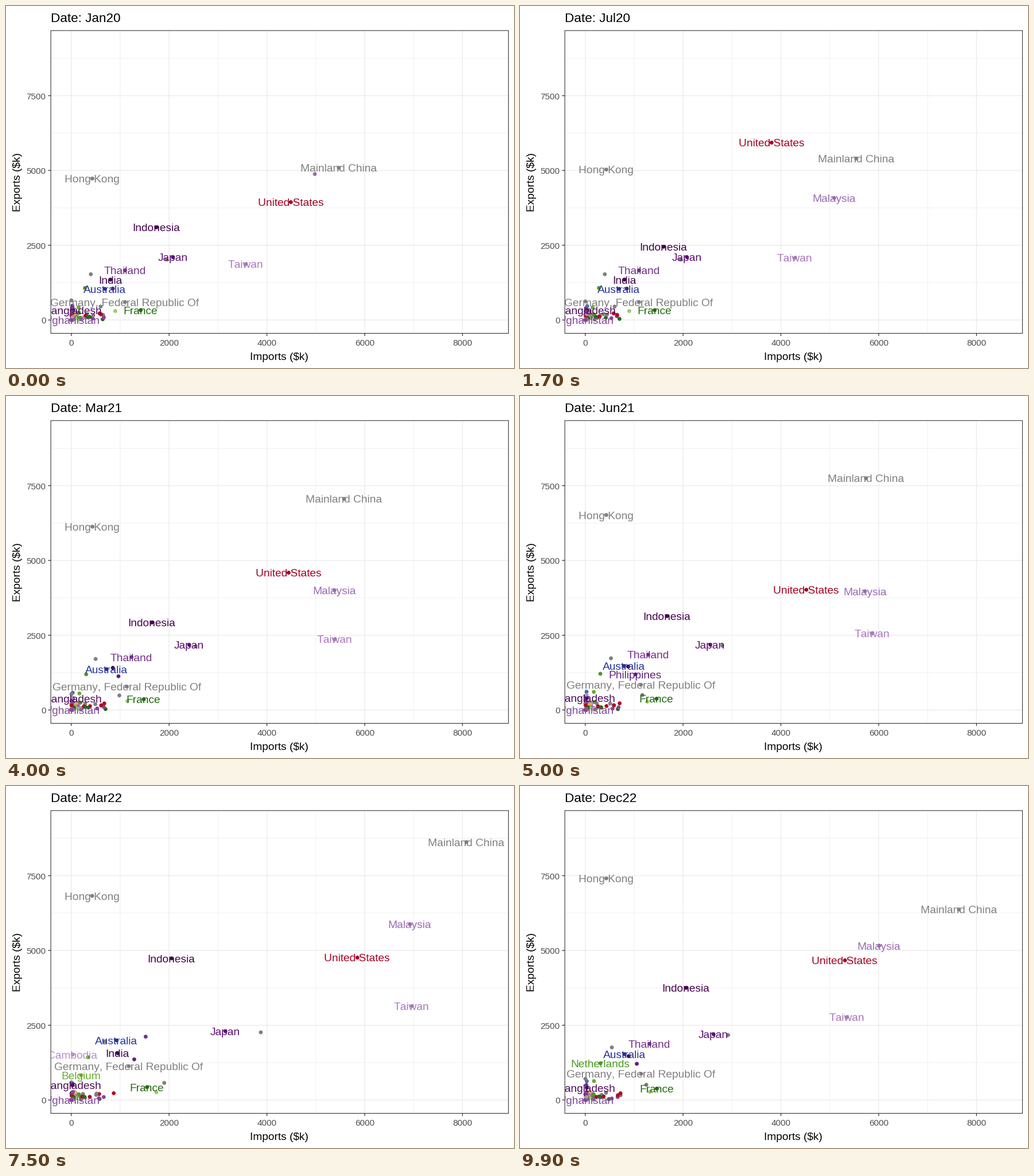
Animation of 885 by 632 pixels, one loop 10000 ms. Source, as a matplotlib script:

```python
import matplotlib.pyplot as plt
import numpy as np
from matplotlib.animation import FuncAnimation
from matplotlib.patches import Rectangle

W, H, DPI = 885, 632, 100
FRAMES, STEP = 100, 100
PT = 72 / DPI                      # points per pixel
X0, Y0 = 113.7, 548.2              # pixel position of the data origin
KX, KY = 85.2, 52.22               # pixels per thousand
LEFT, RIGHT, TOP, BOTTOM = 78.1, 875.4, 42.9, 571.5
BASE, CAP = 19.15, 13.7            # label size and cap height in pixels

GREY, RED, CRIMSON = "#7F7F7F", "#A50021", "#B5081F"
INK, INDIGO, VIOLET = "#46004F", "#5A1070", "#73308A"
PLUM, MAUVE, LILAC = "#85479B", "#9A6BB2", "#B490C8"
FOREST, LEAF, LIME = "#25690F", "#4A9A20", "#98CC66"
BLUE, STEEL, ORANGE = "#26339A", "#3E6FAE", "#F2A65A"

rng = np.random.default_rng(20)
now = np.arange(FRAMES)
months = np.linspace(0, 99, 36)
TURNS = np.array([0, 17, 50, 65, 85, 99])
SURGE = np.array([0, 0, 0.35, 0.6, 1, 0.4])    # trade boom and fallback
free = months[[abs(TURNS - m).min() > 1.5 for m in months]]
knots = np.concatenate([TURNS, free])
order = np.argsort(knots)


def track(values):
    """Straight runs between turning points with small monthly swings."""
    values = np.broadcast_to(values, TURNS.shape)
    swing = np.interp(free, TURNS, values) * rng.normal(1, 0.025, len(free))
    return np.interp(now, knots[order], np.concatenate([values, swing])[order])


countries, crowd = [], []


def add(name, color, imports, exports):
    countries.append((name, color, X0 + KX * track(imports),
                      Y0 - KY * track(exports)))


def boom(name, color, low, high):
    """Move from low to high and back along the shared boom."""
    x, y = (a + (b - a) * SURGE for a, b in zip(low, high))
    add(name, color, x, y)


add("Mainland China", GREY, [5.47, 5.54, 5.74, 7.88, 8.51, 7.64],
    [5.09, 5.40, 7.75, 9.19, 7.79, 6.37])
add("Hong Kong", GREY, 0.43, [4.73, 5.03, 6.52, 7.66, 6.14, 7.41])
add("United States", RED, [4.49, 3.81, 4.52, 5.19, 6.16, 5.31],
    [3.94, 5.93, 4.02, 4.69, 4.85, 4.67])
add("Malaysia", MAUVE, [4.98, 5.09, 5.72, 6.72, 7.24, 6.01],
    [4.88, 4.08, 3.97, 5.23, 6.67, 5.16])
add("Taiwan", "#A878BC", [3.57, 4.29, 5.87, 6.95, 7.30, 5.35],
    [1.87, 2.08, 2.57, 2.94, 3.30, 2.77])
add("Indonesia", INK, [1.74, 1.60, 1.67, 1.95, 2.03, 2.06],
    [3.10, 2.45, 3.14, 3.98, 5.34, 3.75])
add("Cambodia", LILAC, 0.03, [0.1, 0.2, 0.5, 1.29, 1.7, 0.1])
add("Afghanistan", PLUM, 0, 0)
add("Myanmar", PLUM, 0.03, 0.27)
boom("Australia", BLUE, (0.69, 1.04), (0.98, 2.26))
boom("Bangladesh", "#4D0A5E", (0.04, 0.32), (0.02, 0.55))
boom("Belgium", "#69AB2E", (0.15, 0.42), (0.22, 0.95))
boom("Brazil", CRIMSON, (0.58, 0.22), (0.93, 0.23))
boom("France", FOREST, (1.42, 0.33), (1.53, 0.46))
boom("Germany, Federal Republic Of", GREY, (1.10, 0.60), (1.21, 1.29))
boom("India", "#3F0650", (0.80, 1.35), (1.02, 1.64))
boom("Japan", INDIGO, (2.08, 2.10), (3.44, 2.34))
boom("Netherlands", LEAF, (0.28, 1.07), (0.36, 1.47))
boom("Philippines", "#5F1F7F", (0.85, 1.05), (1.36, 1.45))
boom("Republic Of Korea", GREY, (1.95, 2.02), (4.38, 2.40))
boom("Switzerland", LIME, (0.90, 0.30), (1.95, 0.24))
boom("Thailand", VIOLET, (1.10, 1.66), (1.64, 2.20))
boom("United Arab Emirates", GREY, (0.60, 0.45), (2.22, 0.60))
boom("Viet Nam, Socialist Republic Of", GREY, (0.40, 1.53), (0.76, 2.10))
countries.sort()

# unlabelled traders: around the origin, along the bottom, up the axis
for count, wide, tall, tints in [
        (26, 0.22, 0.25, [LILAC, LEAF, LIME, MAUVE, GREY, ORANGE, PLUM]),
        (14, 0.85, 0.20, [CRIMSON, GREY, FOREST, PLUM, CRIMSON, FOREST]),
        (5, 0.06, 0.60, [GREY, VIOLET, STEEL])]:
    for i in range(count):
        x, y = wide * rng.random() ** 1.5, tall * rng.random()
        sway = rng.uniform(0.75, 1.25, (2, len(TURNS)))
        crowd.append((tints[i % len(tints)], X0 + KX * track(x * sway[0]),
                      Y0 - KY * track(y * sway[1])))

plt.rcParams.update({"font.family": "Liberation Sans",
                     "text.kerning_factor": 6})
fig = plt.figure(figsize=(W / DPI, H / DPI), dpi=DPI, facecolor="white")
ax = fig.add_axes([0, 0, 1, 1])
ax.set(xlim=(0, W), ylim=(H, 0))
ax.axis("off")


def line(x, y, color, width):
    ax.plot(x, y, color=color, lw=width * PT, zorder=0,
            solid_capstyle="butt", snap=False)


def write(x, y, s, size, color="black", **kw):
    return ax.text(x, y, s, size=size * PT, color=color, va="baseline", **kw)


for v in range(0, 8001, 1000):
    x, major = X0 + KX * v / 1000, v % 2000 == 0
    line([x, x], [TOP, BOTTOM], "#EBEBEB", 1.3 if major else 0.7)
    if major:
        line([x, x], [BOTTOM, BOTTOM + 4.5], "#333333", 1.3)
        write(x, 592.8, str(v), BASE * 0.8, "#4D4D4D", ha="center")
for v in range(0, 8751, 1250):
    y, major = Y0 - KY * v / 1000, v % 2500 == 0
    line([LEFT, RIGHT], [y, y], "#EBEBEB", 1.3 if major else 0.7)
    if major:
        line([LEFT - 4.8, LEFT], [y, y], "#333333", 1.3)
        write(69.6, y + 6, str(v), BASE * 0.8, "#4D4D4D", ha="right")

panel = Rectangle((LEFT, TOP), RIGHT - LEFT, BOTTOM - TOP, fill=False,
                  ec="#333333", lw=1.1 * PT, zorder=5, snap=False)
ax.add_patch(panel)
write((LEFT + RIGHT) / 2 - 0.7, 618.3, "Imports ($k)", BASE, ha="center")
write(25.5, (TOP + BOTTOM) / 2, "Exports ($k)", BASE, ha="center",
      rotation=90, rotation_mode="anchor")
title = write(77.5, 28.3, "Date: Jan20", 22.5)

dots = crowd + [c[1:] for c in countries]
paths = np.array([[x, y] for _, x, y in dots])
points = ax.scatter(paths[:, 0, 0], paths[:, 1, 0], s=(6.8 * PT) ** 2,
                    c=[d[0] for d in dots], linewidths=0, zorder=2)

labels = []
for name, color, xs, ys in countries:
    text = write(0, 0, name, BASE, color, ha="center", zorder=3, clip_on=True)
    text.set_clip_path(panel)
    labels.append((text, text.get_window_extent().width, xs, ys))


def update(i):
    day = np.datetime64("2020-01-01") + i * 1065 // 99
    title.set_text("Date: " + day.item().strftime("%b%y"))
    points.set_offsets(paths[:, :, i])
    # a label is dropped when it would overlap one already placed
    placed = []
    for text, width, xs, ys in labels:
        x, y = xs[i], ys[i]
        clear = all(abs(x - px) >= (width + pw) / 2 or abs(y - py) >= CAP
                    for px, py, pw in placed)
        text.set_visible(clear)
        if clear:
            placed.append((x, y, width))
            text.set_position((x - 0.4, y + CAP / 2))
    return [title, points]


anim = FuncAnimation(fig, update, frames=FRAMES, interval=STEP,
                     repeat=True, repeat_delay=0, blit=False)
plt.show()
```
